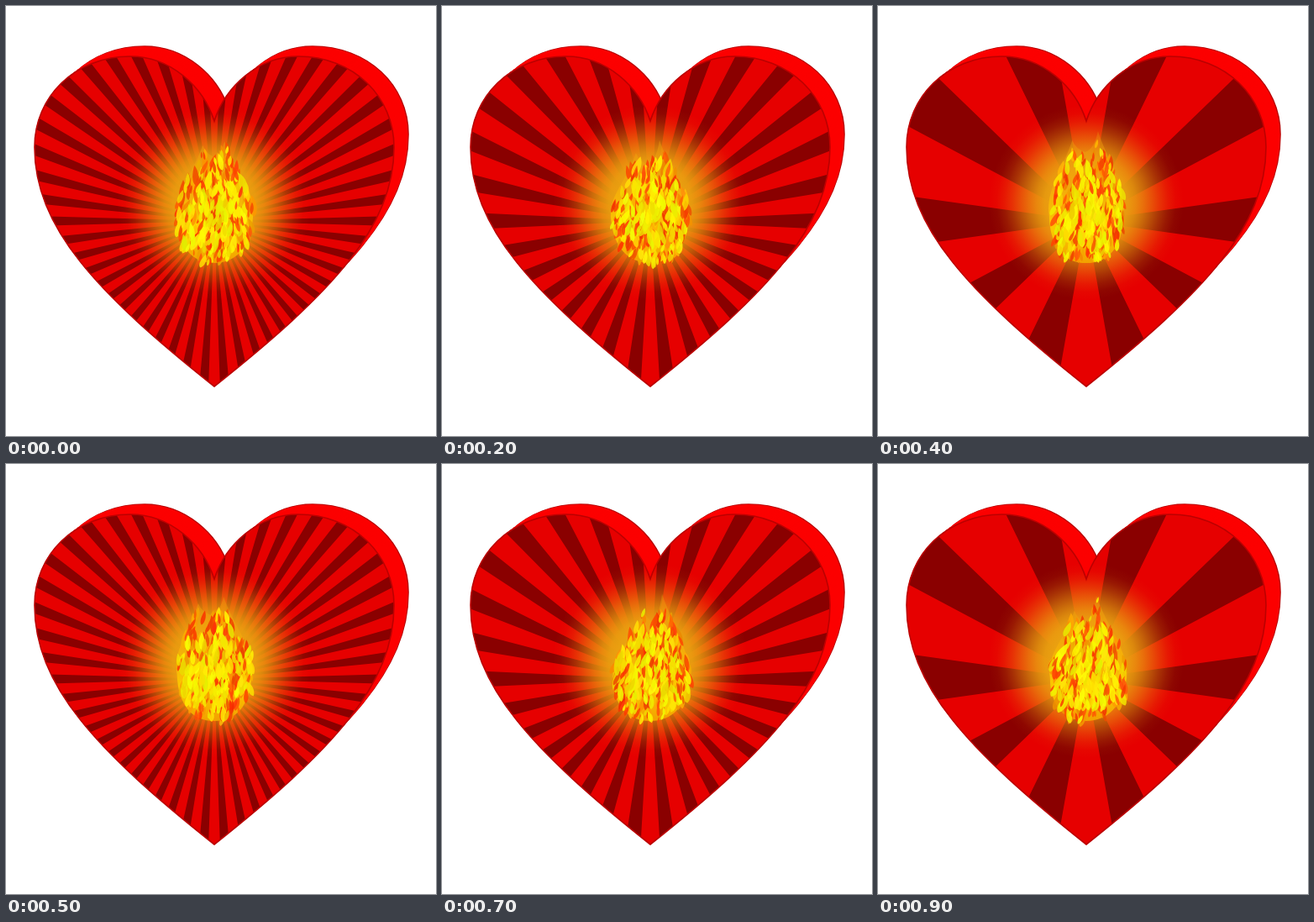
Recreate the animation shown at these times as an HTML page with a canvas. Size 512 by 512 pixels, loop 1000 ms.

```html
<!DOCTYPE html>
<html lang="en">
<head>
<meta charset="utf-8">
<title>Burning heart</title>
<style>
  html, body { margin: 0; width: 100%; height: 100%; overflow: hidden; background: #fff; }
  canvas { display: block; width: 100vmin; height: 100vmin; }
</style>
</head>
<body>
<canvas id="stage" width="512" height="512"></canvas>
<script>
const ctx = document.getElementById('stage').getContext('2d');
const TAU = Math.PI * 2;
const CX = 248, CY = 256;
const STEP = 100, STEPS = 10;

const heart = new Path2D(
  'M248 137 C235 96 196 60 148 60 C82 60 34 108 34 168 C34 263 107 341 248 453' +
  'C389 341 462 263 462 168 C462 108 414 60 348 60 C300 60 261 96 248 137Z');

function seeded(seed) {
  return () => {
    seed = (seed + 0x6D2B79F5) | 0;
    let t = Math.imul(seed ^ (seed >>> 15), 1 | seed);
    t = (t + Math.imul(t ^ (t >>> 7), 61 | t)) ^ t;
    return ((t ^ (t >>> 14)) >>> 0) / 4294967296;
  };
}

// Stacks copies of the heart from back to front; the back one is slightly flatter
function drawSides() {
  const layers = 34;
  for (let i = layers; i > 0; i--) {
    const depth = i / layers;
    const squash = 1 - 0.03 * depth;
    ctx.save();
    ctx.translate(17 * depth, 60 - 12 * depth - 60 * squash);
    ctx.scale(1, squash);
    ctx.fillStyle = '#fc0000';
    ctx.fill(heart);
    if (i === layers) {
      ctx.strokeStyle = '#b80000';
      ctx.lineWidth = 1.6;
      ctx.stroke(heart);
    }
    ctx.restore();
  }
}

function drawRays(count) {
  const turn = TAU / count;
  const half = turn * 2 / 9;
  ctx.fillStyle = '#8a0000';
  ctx.beginPath();
  for (let i = 0; i < count; i++) {
    ctx.moveTo(CX, CY);
    ctx.arc(CX, CY, 400, i * turn - half, i * turn + half);
    ctx.closePath();
  }
  ctx.fill();
}

function drawGlow() {
  const glow = ctx.createRadialGradient(CX, 234, 40, CX, 234, 116);
  for (let t = 0; t <= 1; t += 0.125) {
    const alpha = 1 - t * t * (3 - 2 * t);
    glow.addColorStop(t, `rgba(234,160,16,${alpha})`);
  }
  ctx.fillStyle = glow;
  ctx.fillRect(100, 100, 300, 270);
}

// Round base, two licking tips
function flamePath(rand) {
  const vary = (mid, spread) => mid + (rand() * 2 - 1) * spread;
  const lx = vary(234, 7), ly = vary(165, 12);
  const rx = vary(259, 6), ry = vary(159, 12);
  const left = vary(198, 3), right = vary(298, 3);
  const wide = vary(246, 5), notch = Math.max(ly, ry) + 14;
  const p = new Path2D();
  p.moveTo(248, 306);
  p.bezierCurveTo(222, 306, 205, 288, left + 4, wide + 8);
  p.bezierCurveTo(left, wide - 22, lx - 12, ly + 36, lx, ly);
  p.quadraticCurveTo(lx + 4, notch - 4, (lx + rx) / 2, notch);
  p.quadraticCurveTo(rx - 4, notch - 4, rx, ry);
  p.bezierCurveTo(rx + 12, ry + 36, right, wide - 22, right - 4, wide + 8);
  p.bezierCurveTo(291, 288, 274, 306, 248, 306);
  return p;
}

function fleck(x, y, len, wid, lean, color) {
  ctx.save();
  ctx.translate(x, y);
  ctx.rotate(lean);
  ctx.fillStyle = color;
  ctx.beginPath();
  ctx.moveTo(0, -len / 2);
  ctx.bezierCurveTo(wid, -len / 6, wid * 0.8, len / 3, 0, len / 2);
  ctx.bezierCurveTo(-wid, len / 3, -wid * 0.5, -len / 6, 0, -len / 2);
  ctx.fill();
  ctx.restore();
}

function drawFlame(step) {
  const rand = seeded(step * 97 + 11);
  const shape = flamePath(rand);
  const body = ctx.createLinearGradient(0, 150, 0, 306);
  body.addColorStop(0, 'rgba(236,150,12,0.3)');
  body.addColorStop(0.4, '#f2a80c');
  body.addColorStop(0.75, '#fcc800');
  body.addColorStop(1, '#f2a000');
  ctx.fillStyle = body;
  ctx.fill(shape);

  // heat is 1 in the low middle of the flame and falls towards its edges
  const heat = (x, y) => Math.exp(-(((x - CX) / 46) ** 2) - ((y - 252) / 52) ** 2);

  function scatter(count, len, wid, hue, hot) {
    while (count > 0) {
      const x = 190 + rand() * 116;
      const y = 142 + rand() * 166;
      if (!ctx.isPointInPath(shape, x, y)) continue;
      if (hot && rand() > heat(x, y)) continue;
      const lean = (rand() - 0.4) * 0.8 + (CX - x) * 0.004;
      const size = (0.6 + rand() * 0.7) * (y > 285 || y < 185 ? 0.75 : 1);
      const color = `hsla(${hue + rand() * 12},100%,${46 + rand() * 6}%,0.85)`;
      fleck(x, y, len * size, wid * size, lean, color);
      count--;
    }
  }
  scatter(80, 20, 5, 32, false);
  scatter(70, 19, 4.5, 10, false);
  scatter(75, 21, 6, 50, true);
  scatter(60, 15, 3, 12, false);
  scatter(60, 17, 4.5, 52, true);
}

function draw(step) {
  ctx.fillStyle = '#fff';
  ctx.fillRect(0, 0, 512, 512);
  drawSides();

  ctx.save();
  ctx.clip(heart);
  ctx.fillStyle = '#e60000';
  ctx.fillRect(0, 0, 512, 512);
  drawRays(50 - 10 * (step % 5));
  drawGlow();
  ctx.restore();

  ctx.strokeStyle = '#bc0000';
  ctx.lineWidth = 1.6;
  ctx.stroke(heart);
  drawFlame(step);
}

let shown = -1;
function tick() {
  const step = Math.floor(performance.now() / STEP) % STEPS;
  if (step !== shown) draw(shown = step);
  requestAnimationFrame(tick);
}
tick();
</script>
</body>
</html>
```
